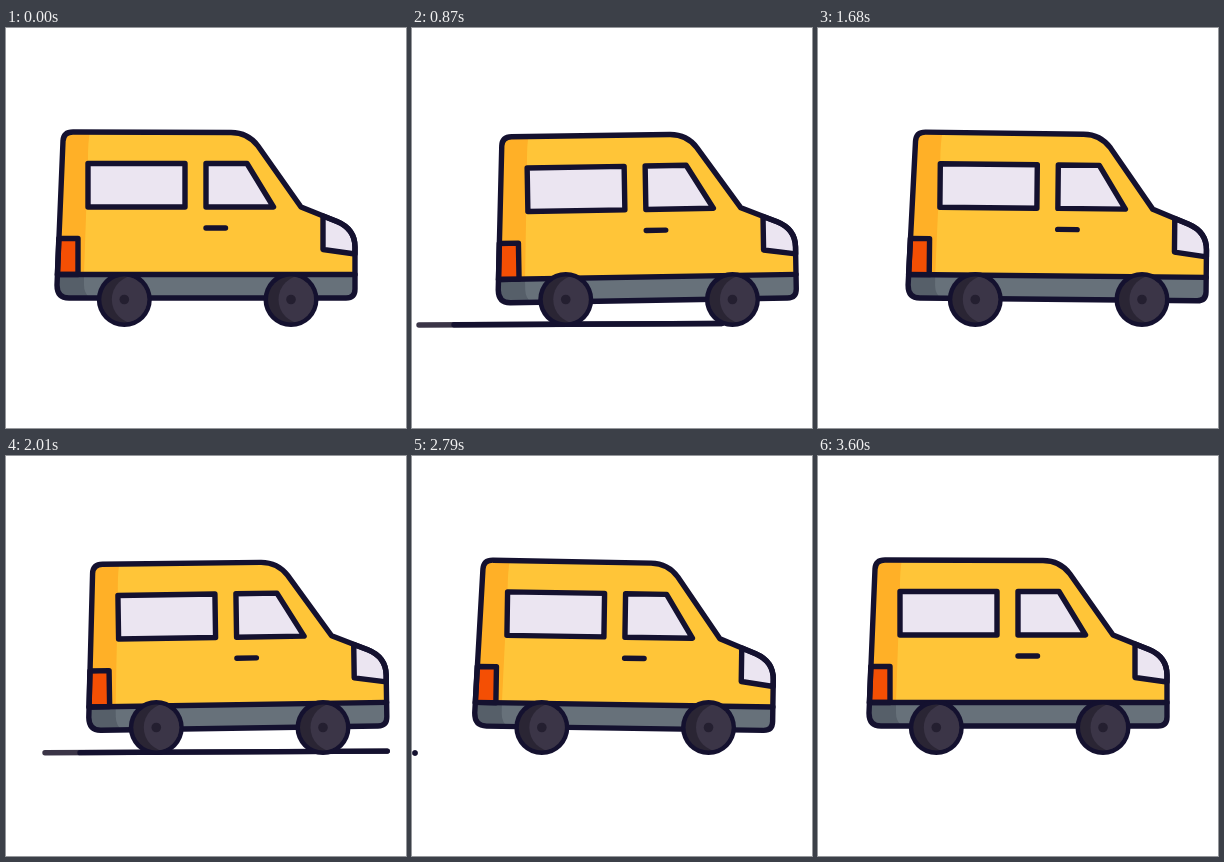
An HTML page with a canvas that plays this animation: 400x400 px, repeating every 4630 ms.

```html
<!DOCTYPE html>
<html lang="en">
<head>
<meta charset="utf-8">
<title>Van</title>
<style>
html, body { margin: 0; width: 100%; height: 100%; overflow: hidden; background: #fff; }
canvas { display: block; width: 100vw; height: 100vh; }
</style>
</head>
<body>
<canvas id="stage"></canvas>
<script>
const SIZE = 400, LOOP = 4630, DRIVE = 3600, STEP = 30;
const INK = '#14112f', GLASS = '#ebe5f1', TYRE = '#3b3547';

const canvas = document.getElementById('stage');
const ctx = canvas.getContext('2d');
const ratio = window.devicePixelRatio || 1;
canvas.width = canvas.height = SIZE * ratio;

const clamp = u => Math.min(1, Math.max(0, u));
const smooth = u => { u = clamp(u); return u * u * (3 - 2 * u); };
const mix = (a, b, u) => a + (b - a) * u;

const shell = new Path2D(
  'M57 113 Q57.500 104 67 104 L225 104.500 Q242 104.500 252 118 L295 179 L331 193.500' +
  ' Q349 201 349 219 V261 Q349 270 340 270 H63 Q51 270 51 257 Z');
const shadow = new Path2D('M40 95 H86 Q82 107 82 130 L78 246.500 H40 Z');
const bumperShadow = new Path2D('M40 246.500 H78 V257 Q78 266 85 271 H40 Z');
const lamp = new Path2D('M317 188 V221.500 L349 226 V219 Q349 201 331 193.500 Z');
const tailLight = new Path2D('M52.800 210.500 H72 V246.500 H51.400 Z');
const windows = new Path2D(
  'M82 135.500 H179 V179 H82 Z M200 135.500 H241 L267.500 179 H200 Z');
const trim = new Path2D('M51.500 246.500 H349 M200 200 H219.500');

function fill(path, color) {
  ctx.fillStyle = color;
  ctx.fill(path);
}

function outline(path) {
  ctx.strokeStyle = INK;
  ctx.lineWidth = 5.4;
  ctx.stroke(path);
}

function disc(x, y, r, color) {
  ctx.beginPath();
  ctx.arc(x, y, r, 0, Math.PI * 2);
  ctx.fillStyle = color;
  ctx.fill();
}

function drawBody() {
  ctx.save();
  ctx.clip(shell);
  fill(shell, '#ffc538');
  fill(shadow, '#ffb027');
  ctx.fillStyle = '#67717a';
  ctx.fillRect(40, 246.5, 320, 30);
  fill(bumperShadow, '#565f69');
  ctx.restore();

  fill(tailLight, '#f44f04');
  fill(lamp, GLASS);
  fill(windows, GLASS);
  [tailLight, lamp, windows, trim, shell].forEach(outline);
}

function drawWheel(x) {
  const y = 271.5;
  disc(x, y, 27.5, INK);
  disc(x, y, 23, '#2a2534');
  ctx.save();
  ctx.beginPath();
  ctx.arc(x, y, 23, 0, Math.PI * 2);
  ctx.clip();
  disc(x + 11.5, y, 24, TYRE);
  ctx.restore();
  disc(x, y, 4.8, '#241f30');
}

function roadStroke(from, to, color) {
  const roadY = x => 297 - x * 0.005;
  ctx.beginPath();
  ctx.moveTo(from, roadY(from));
  ctx.lineTo(to, roadY(to));
  ctx.strokeStyle = color;
  ctx.lineWidth = 5.4;
  ctx.stroke();
}

// The road line sweeps in from the right and is pulled out to the left.
function drawRoad(t) {
  const p = t % 600;
  if (t >= 3000 || p === 0 || p > 390) return;
  const head = mix(403, 3, 1 - (1 - clamp(p / 300)) ** 2);
  const tail = mix(403, 3, clamp((p - 150) / 240) ** 2.1);
  roadStroke(head, tail, TYRE);
  roadStroke(Math.min(head + 35, tail), tail, INK);
}

// Rocking: nose down, then tail down, once every 1200 ms.
function rock(t) {
  const p = t % 1200;
  if (p < 300) return smooth(p / 300);
  if (p < 900) return 1 - 2 * smooth((p - 300) / 600);
  return smooth((p - 900) / 300) - 1;
}

function draw(t) {
  const shift = 43.5 * (t < 1200 ? smooth(t / 1200) : 1 - smooth((t - 1200) / 2400));
  const tilt = rock(t);

  ctx.setTransform(canvas.width / SIZE, 0, 0, canvas.height / SIZE, 0, 0);
  ctx.fillStyle = '#fff';
  ctx.fillRect(0, 0, SIZE, SIZE);
  ctx.lineCap = ctx.lineJoin = 'round';

  drawRoad(t);
  ctx.translate(shift, 0);
  ctx.save();
  ctx.translate(200, 270 + 2.5 * Math.abs(tilt));
  ctx.rotate(tilt * Math.PI / 180);
  ctx.translate(-200, -270);
  drawBody();
  ctx.restore();
  drawWheel(118.3);
  drawWheel(285);
}

const start = performance.now();
function tick() {
  const t = (performance.now() - start) % LOOP;
  draw(Math.min(DRIVE, Math.floor(t / STEP) * STEP));
  requestAnimationFrame(tick);
}
tick();
</script>
</body>
</html>
```
